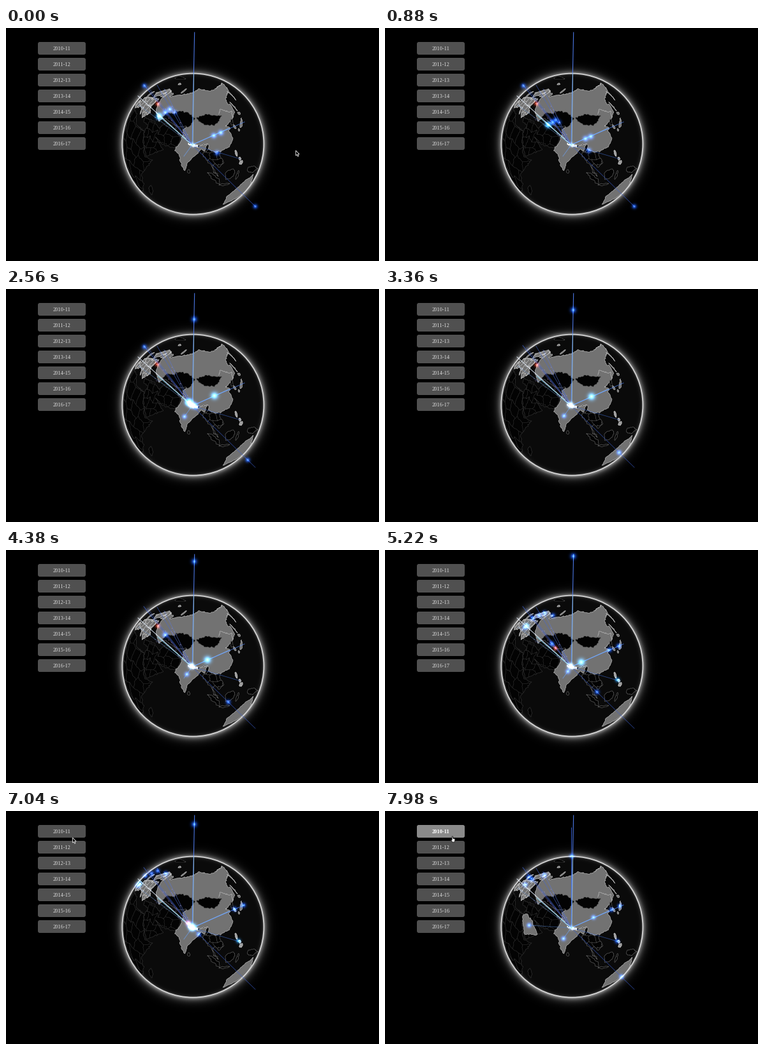
A matplotlib script for the animation above (8 s loop, 585 px wide and 367 px high).

```python
import numpy as np
import matplotlib.pyplot as plt
from matplotlib.animation import FuncAnimation
from matplotlib.collections import LineCollection
from matplotlib.patches import Circle, FancyBboxPatch, Polygon

W, H, DPI = 585, 367, 100
PX = 72 / DPI
STEP, LOOP = 20, 8000
CX, CY, R = 293.4, 182.6, 111
LON0, LAT0, DIST = 84.3, 29, 14
HUB = np.array([292, 184])
SWITCH = 7.7
rng = np.random.default_rng(7)

fig = plt.figure(figsize=(W / DPI, H / DPI), dpi=DPI, facecolor="black")
ax = fig.add_axes([0, 0, 1, 1])


def reset_axes():
    ax.clear()
    ax.set_axis_off()
    ax.set_xlim(0, W)
    ax.set_ylim(H, 0)


def show(img):
    return ax.imshow(img, extent=(0, W, H, 0), aspect="auto",
                     interpolation="nearest")


def project(pts):
    """Perspective view of lon/lat points; hidden ones slide to the limb."""
    lon, lat = np.radians(pts[:, 0] - LON0), np.radians(pts[:, 1])
    c = np.radians(LAT0)
    x = np.cos(lat) * np.sin(lon)
    y = np.sin(lat) * np.cos(c) - np.cos(lat) * np.cos(lon) * np.sin(c)
    z = np.sin(lat) * np.sin(c) + np.cos(lat) * np.cos(lon) * np.cos(c)
    limb = 1 / DIST
    k = np.where(z < limb, np.sqrt(1 - limb**2) / np.hypot(x, y), 1)
    f = k * R * np.sqrt(DIST**2 - 1) / (DIST - np.maximum(z, limb))
    return np.column_stack([CX + x * f, CY - y * f])


def rough(pts, closed=True):
    """Line through the points with irregular, coast-like edges."""
    ends = np.roll(pts, -1, axis=0) if closed else pts[1:]
    out = []
    for a, b in zip(pts, ends):
        n = max(1, int(np.ceil(np.hypot(*(b - a)) / 1.4)))
        seg = a + (b - a) * np.arange(n)[:, None] / n
        seg[1:] += rng.normal(0, 0.36, (n - 1, 2))
        out.append(seg)
    return project(np.vstack(out if closed else out + [pts[-1:]]))


def borders(pts, size):
    """Brick-like net of crooked borders over the box of an outline."""
    (x0, y0), (x1, y1) = pts.min(axis=0), pts.max(axis=0)
    net = []
    for y in np.arange(y0, y1 + size, size):
        xs = np.arange(x0, x1 + size, size * 0.6)
        row = np.column_stack([xs, np.full(len(xs), y)])
        row += rng.normal(0, size * 0.17, row.shape)
        if net:
            k = len(net) % 2
            lines.extend(rough(np.array(p), False)
                         for p in zip(net[-1][k::2], row[k::2]))
        net.append(row)
        lines.append(rough(row, False))


shapes = []
lines = []


def land(fill, edge, *flat, cells=0):
    global lines
    pts = np.array(flat, float).reshape(-1, 2)
    lines = []
    if cells:
        borders(pts, cells)
    shapes.append((rough(pts), fill, edge, lines))


def island(fill, edge, lon, lat, length, width, tilt):
    a = np.linspace(0, 2 * np.pi, 13)[:-1]
    u = length * np.cos(a) + 1j * width * np.sin(a)
    u *= rng.uniform(0.75, 1.2, 12) * np.exp(1j * np.radians(tilt))
    land(fill, edge, *np.column_stack([lon + u.real, lat + u.imag]).ravel())


DARK, GREY, WHITE = "#030303", "#727272", "#ffffff"
DIM, MID, LIGHT = "#383838", "#6a6a6a", "#c4c4c4"

# Africa, the Near East and Indochina
land(DARK, DIM, -5, 35, 11, 37, 20, 31, 34, 31, 43, 12, 51, 12, 40, -4,
     40, -15, 33, -27, 20, -30, 10, 0, cells=10)
land(DARK, DIM, 27, 40, 41, 41, 50, 37, 54, 42, 70, 42, 75, 37, 70, 25,
     57, 26, 49, 30, 59, 22, 44, 13, 35, 29, 36, 36, 28, 37, cells=7)
land(DARK, MID, 92, 21, 95, 16, 98.5, 12, 100, 6.5, 104, 1.5, 99.5, 10,
     102, 12.5, 105, 9, 109, 12, 106, 19, 108, 21.5, 98, 25, cells=5)

# Russia with China, then the dark countries between them
land(GREY, LIGHT, 38, 47, 47, 42, 51, 48, 80, 42, 74, 39.5, 79, 33, 82, 30,
     89, 28, 97, 28.5, 98, 24, 102, 21.5, 108, 21.6, 116, 23, 121.5, 28.5,
     119.5, 35, 122, 37, 118, 39, 122, 40, 131, 43, 138, 46, 141, 53,
     137, 54, 143, 59, 162, 61.5, 156, 52, 164, 60, 188, 66, 160, 70,
     130, 71, 105, 77, 73, 71.5, 54, 68.5, 38, 64, 41, 67, 29, 69, 28, 60,
     32, 52.5)
land(DARK, MID, 48, 46, 51, 51, 61, 51, 62, 54, 77, 54, 87, 49, 80, 42,
     66, 42, 56, 45)
land(DARK, MID, 88, 49, 99, 51.8, 107, 50, 119, 48, 112, 44, 105, 41.7, 96, 43)
land(GREY, LIGHT, 75, 36, 81, 29, 88, 26.5, 97, 28.5, 93.5, 23, 91, 25,
     88.5, 22, 85, 19.5, 80.2, 15, 78, 8, 75, 12.5, 72.5, 21, 69, 23, 74, 32)
land(GREY, LIGHT, 114, -22, 114, -34, 146, -30, 142, -11, 136.5, -12,
     131, -11.5, 125, -15)

# Europe
land(GREY, "#d8d8d8", -9, 37, -9, 43, -1, 44, -4, 48.5, 8, 54, 24, 58,
     24, 49, 30, 45, 23, 38, 13, 45, 17, 39, 10, 44, -3, 36.5, cells=6)
land(GREY, "#d8d8d8", 5, 59, 13, 56, 18, 60, 24, 66, 22, 60, 29, 61, 30, 69,
     18, 69.5, cells=7)

for spot in [(47, -18, 6, 2, 75), (-40, 77, 16, 5, 10), (81, 7.5, 1.6, 1, 90),
             (101, 0, 7, 1.6, -48), (110, -7.4, 4.6, 0.8, -8),
             (114, 1, 4.5, 3.6, 50), (121, -2, 3.4, 1, 70),
             (140, -5, 9, 2.4, -24), (127, 40, 2.6, 1.4, 60)]:
    island(DARK, DIM if spot[0] < 60 else MID, *spot)
for spot in [(-2, 54, 4, 2, 100), (58, 73.5, 5, 1.4, 35), (18, 78.5, 7, 1.2, 0),
             (143, 50, 4, 0.6, 90), (127.7, 36, 1.8, 1.2, 100),
             (137, 35.8, 5, 1.2, 35), (142.5, 43.3, 2, 1.3, 0), (131, 32.5, 1, 1, 0)]:
    island(GREY, LIGHT, *spot)
for spot in [(121.3, 16.3, 2.6, 1, 100), (124, 11, 1.6, 1, 120), (125, 7.5, 1.8, 1.5, 0)]:
    island("#999999", "#e8e8e8", *spot)

land(GREY, LIGHT, 35, 29, 39, 32, 46.5, 29, 51.5, 24, 55, 20, 43, 16.5)
land(WHITE, WHITE, 80.3, 29.5, 88, 28, 88, 26.5, 80.3, 28.7)
arabia, hub_land = shapes[-2:]
frontier = rough(np.array([(116, 49.5), (121, 53), (131, 48), (135, 48), (131, 43)]), False)

# Routes: end point, opacity, colour
ROUTES = [(207, 107, .85, "#e8f2ff"), (216, 89, .7, "#3f66e0"),
          (222, 92, .5, "#4a6cd8"), (237, 90, .6, "#4468d8"),
          (248, 96, .6, "#5a78d8"), (208, 121, .5, "#7aa8e8"),
          (238, 137, .8, "#8ce4ff"), (238, 120, .5, "#8a78b8"),
          (295.7, 7, .95, "#4f7df0"), (350, 158, .9, "#8cc4ff"),
          (374, 148, .7, "#5a90ff"), (279, 202, .7, "#6ca0f0"),
          (391, 281, .6, "#3b5fd0"), (367, 206, .6, "#3f6cd0")]
NEW_ROUTES = [(292, 26, .8, "#3f6cf0"), (226, 180, .6, "#4a78c0")]


def draw_land(xy, fill, edge, inner, lw=0.6):
    patch = ax.add_patch(Polygon(xy, fc=fill, ec=edge, lw=lw * PX))
    if inner:
        net = ax.add_collection(LineCollection(
            inner, colors=edge, linewidths=0.5 * PX, zorder=1))
        net.set_clip_path(patch)


def button(y, colour):
    return FancyBboxPatch((53, y - 7), 69, 14, fc=colour, ec="none",
                          boxstyle="round,pad=3,rounding_size=3")


def label(y, text, colour, **kw):
    return ax.text(87.5, y + 0.3, text, color=colour, ha="center",
                   va="center_baseline", family="Liberation Serif",
                   size=8.4 * PX, **kw)


def draw_globe(switched):
    reset_axes()
    yy, xx = np.mgrid[0:H, 0:W] + 0.5
    d = np.hypot(xx - CX, yy - CY) - R
    lit = 1 + 0.12 * (yy - CY) / R
    halo = np.where(d > 0, 0.62 * np.exp(-np.abs(d) / 4.6) * lit,
                    0.04 + 0.3 * np.exp(-np.abs(d) / 1.8))
    show(np.clip(np.dstack([halo] * 3), 0, 1))
    for shape in shapes[:-2] + [arabia] * switched:
        draw_land(*shape)
    ax.plot(*frontier.T, color=LIGHT, lw=0.6 * PX)
    ax.add_patch(Circle((CX, CY), R, fill=False, ec="#d6d6d6", lw=1.7 * PX))

    for x, y, alpha, col in ROUTES + NEW_ROUTES * switched:
        ax.plot([HUB[0], x], [HUB[1], y], color=col, alpha=alpha,
                lw=(0.4 + 0.75 * alpha) * PX)
    ax.plot([293, 294.6], [182, 71], color="#a8dcf0", alpha=0.7, lw=PX)

    # Small violet sparks along the western routes
    r = np.random.default_rng(3)
    n = 34
    ends = np.array([e[:2] for e in ROUTES[:8]])[r.integers(0, 8, n)]
    pts = HUB + (ends - HUB) * r.uniform(0.15, 0.75, (n, 1)) + r.normal(0, 1, (n, 2))
    ax.add_collection(LineCollection(
        [[p, p + 1.3] for p in pts], colors="#a89ad8", alpha=0.55,
        linewidths=0.9 * PX))
    draw_land(*hub_land, lw=1.2)

    for i in range(7):
        y = 32 + 25 * i
        ax.add_patch(button(y, "#505050"))
        label(y, f"{2010 + i}-{11 + i}", "#dddddd")
    fig.canvas.draw()
    return np.asarray(fig.canvas.buffer_rgba())[..., :3].astype(np.float32)


BLUE, CYAN, RED, PALE = np.array(
    [(28, 95, 255), (50, 165, 255), (235, 70, 45), (150, 195, 255)])

# Inbound particles at steady pace: start, end, origin, strength
STEADY = [(0, 2.8, 337, 165, .9), (0, 2.6, 326, 169.5, .9), (0, 3, 331, 197, .8),
          (0, 2.9, 240, 139, 1.3), (0, 2.9, 250, 133, .9), (0, 2.9, 257, 128, .9),
          (0, 2.9, 265, 133, .6), (3.6, 7.4, 239, 121, .9)]
# Inbound particles that linger at the origin first
EASED = [(2.4, SWITCH, 327, 168, 1), (.9, 8.6, 391, 281, .85), (2.6, 7.4, 280, 201, .8)]
# Late particles, at their places six seconds in
WEST = [(217, 117), (214, 120), (226, 105), (236, 101), (245, 97), (258, 101)]
EAST = [(355, 156), (369, 150)]
# First particles after the year changes
FRESH = [(327, 167.5), (280, 201), (364, 205), (371, 261), (226, 180), (355, 155.5),
         (368, 149.5), (220, 116), (225, 104), (230, 107), (250, 101), (293, 71)]


def ramp(t, start, end):
    """Opacity of something that lives from start to end."""
    rise = 1 if start <= 0 else (t - start) / 0.25
    return float(np.clip(min(rise, (end - t) / 0.15), 0, 1))


def particles(t):
    """Yield x, y, colour, strength and spread of every glow."""
    yield 292.5, 184, PALE, 0.45, 2.6
    if t >= SWITCH:
        for x, y in FRESH:
            yield x, y, BLUE, 0.85, 2.5
        return
    for t0, t1, x, y, power in STEADY:
        u = np.clip((t - t0) / (t1 - t0), 0, 1)
        col = CYAN if power > 1 else BLUE
        yield *((x, y) + (HUB - (x, y)) * u), col, power * ramp(t, t0, t1), 2 + power
    for t0, t1, x, y, power in EASED:
        u = np.clip((t - t0) / (t1 - t0), 0, 1)
        u = u * u * (3 - 2 * u)
        yield (*((x, y) + (HUB - (x, y)) * u), CYAN if power == 1 else BLUE,
               power * ramp(t, t0 - 1.2, t1), 2.6 if power < 1 else 3.8)

    yield 295.3, 8 + 7.5 * abs(t - 5.6)**1.5, BLUE, 0.9 * ramp(t, 1.3, SWITCH), 3.2
    yield 217, 91, BLUE, 0.8 * ramp(t, 0, 2.9), 2.7
    yield 290.5, 182.5, PALE, 1.1 * ramp(t, 2.1, SWITCH), 3

    late, dt = ramp(t, 4.9, SWITCH), t - 6
    for i, (x, y) in enumerate(WEST):
        yield x - 7 * dt, y - 2.6 * dt, BLUE if i else CYAN, 0.85 * late, 2.6
    for x, y in EAST:
        yield x + 3.4 * dt, y - 1.5 * dt, BLUE, 0.9 * late, 2.6
    yield 364.5, 204.5, CYAN, 0.85 * late, 2.5

    dip = np.exp(-((t - 1.78) / 0.6)**2)
    yield 237.7 - 4.5 * dip, 119.5 - 5 * dip, RED, 0.75 * ramp(t, 0, 4.9), 2.4
    for t0 in (5, 6.1):
        u = np.clip((t - t0) / 1.2, 0, 1)
        yield 262 + 30 * u, 148 + 36 * u, RED, 0.9 * ramp(t, t0, t0 + 1.25), 2.4


def add_glow(img, x, y, colour, power, spread):
    if power <= 0:
        return
    reach = int(spread * 3.2)
    x0, x1 = max(0, int(x) - reach), min(W, int(x) + reach + 1)
    y0, y1 = max(0, int(y) - reach), min(H, int(y) + reach + 1)
    yy, xx = np.mgrid[y0:y1, x0:x1] + 0.5
    q = ((xx - x)**2 + (yy - y)**2)[..., None] / (2 * spread**2)
    img[y0:y1, x0:x1] += power * (colour * np.exp(-q) + 75 * np.exp(-6 * q))


base_old, base_new = draw_globe(False), draw_globe(True)

reset_axes()
screen = show(base_old.astype(np.uint8))
hover = ax.add_patch(button(32, "#8a8a8a"))
hover_text = label(32, "2010-11", "white", weight="bold")

ARROW = np.array([(0, 0), (0, 8), (1.8, 6.4), (3.1, 9.3), (4.4, 8.7), (3.1, 5.9), (5.6, 5.8)])
HAND = np.array([(0, 0), (1.4, 0), (1.6, 3), (5, 4), (4, 9), (0.6, 9), (-2, 5.4), (0, 6)])
cursor = ax.add_patch(Polygon(ARROW, fc="black", ec="#dddddd", lw=0.9 * PX, zorder=9))


def place_cursor(t):
    cursor.set_visible(t < 0.4 or 5.66 <= t < 5.8 or t >= 6.24)
    x, y = 454.5, 193
    if t > 5:
        u = np.clip((t - 5.8) / 1.1, 0, 1)
        x, y = 422 - 317.5 * u, 190 - 148 * u
    hand = t >= 7.44
    cursor.set_xy(HAND + (105, 40) if hand else ARROW + (x, y))
    cursor.set_facecolor("white" if hand else "black")
    cursor.set_edgecolor("#222222" if hand else "#dddddd")


def update(i):
    t = i * STEP / 1000
    img = (base_new if t >= SWITCH else base_old).copy()
    for glow in particles(t):
        add_glow(img, *glow)
    screen.set_data(np.clip(img, 0, 255).astype(np.uint8))
    lit = float(np.clip((t - 7.46) / 0.24, 0, 1))
    hover.set_alpha(lit)
    hover_text.set_alpha(lit)
    place_cursor(t)
    return screen, hover, hover_text, cursor


anim = FuncAnimation(fig, update, frames=LOOP // STEP, interval=STEP,
                     repeat=True, repeat_delay=0, blit=False)
plt.show()
```
